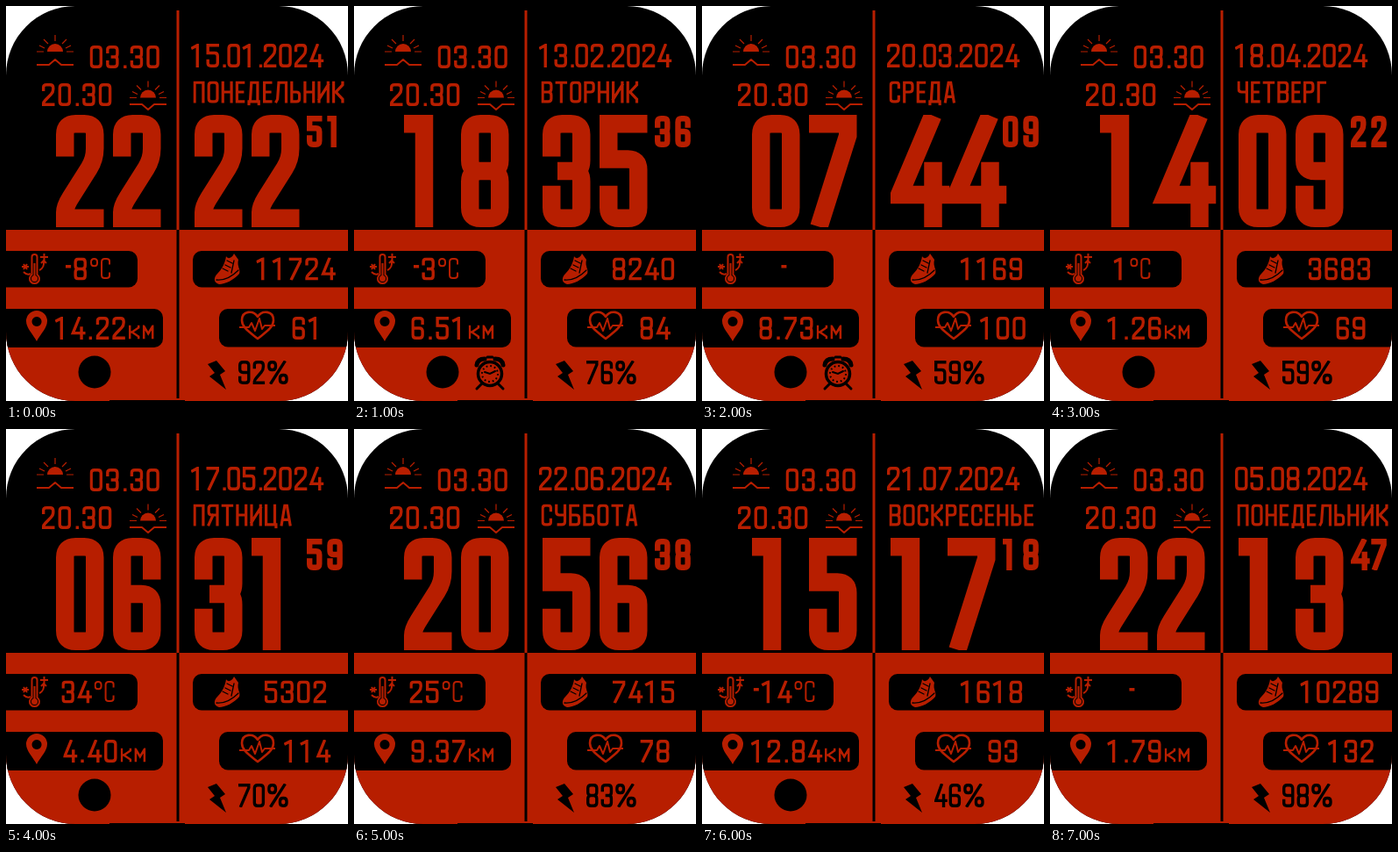
An HTML page that plays this animation: 390 by 450 pixels, repeating every 8000 ms.

```html
<!DOCTYPE html>
<html lang="ru">
<head>
<meta charset="utf-8">
<title>Циферблат</title>
<style>
  html, body { margin: 0; width: 100%; height: 100%; overflow: hidden; background: #fff; }
  svg { display: block; }
  #stage { width: 100%; height: 100%; --red: #b71e00; }
  .red { fill: var(--red); }
  .line { fill: none; stroke: var(--red); stroke-width: 2; stroke-linejoin: round; }
  .thin { stroke-width: 1.2; }
  .ink { fill: none; stroke: #000; stroke-width: 2; stroke-linecap: round; }
  .glyphs { fill: none; stroke: var(--red); stroke-linecap: square; stroke-miterlimit: 4; }
  .dark { stroke: #000; }
</style>
</head>
<body>
<svg id="stage" viewBox="0 0 390 450">
  <defs>
    <clipPath id="face"><rect width="390" height="450" rx="79"/></clipPath>
    <g id="sun">
      <path class="red" d="M-9 0a9 9 0 0 1 18 0z"/>
      <path class="line thin" d="M-21 0H-13M13 0H21M0-12V-19M-8-9L-13-14M8-9L13-14M-12-4L-18-7M12-4L18-7"/>
    </g>
  </defs>
  <g clip-path="url(#face)">
    <rect width="390" height="450"/>
    <rect class="red" y="255" width="390" height="195"/>
    <rect class="red" x="194.5" y="5" width="3" height="250"/>
    <rect x="194.5" y="255" width="3" height="192"/>
    <rect x="118" y="449" width="86" height="1"/>
    <rect x="-20" y="279" width="170" height="41.500" rx="10"/>
    <rect x="-20" y="345" width="199" height="44" rx="10"/>
    <rect x="213" y="279" width="200" height="41.500" rx="10"/>
    <rect x="243" y="345" width="170" height="43.500" rx="10"/>

    <use href="#sun" x="56" y="52"/>
    <path class="line" d="M35 67H49L56 61L63 67H77"/>
    <use href="#sun" x="162" y="104.500"/>
    <path class="line" d="M141 112H155L162 118L169 112H183"/>

    <g id="thermo">
      <path class="line" d="M29.500 306V286a3 3 0 0 1 6 0V306a5.500 5.500 0 1 1-6 0z"/>
      <path class="line" d="M32.500 293V309M18 297H26M20 294L24 300M24 294L20 300M20 303q4 4 8 2M38 301q6-3 5-10M40 293L43 290L46 293"/>
      <circle class="red" cx="32.500" cy="310.500" r="3.500"/>
      <path class="line" d="M39 286H48M43.500 282V290"/>
    </g>
    <path class="red" fill-rule="evenodd" d="M35 382C31 374 23 367 23 359a12 12 0 0 1 24 0C47 367 39 374 35 382zM35 354a5.500 5.500 0 1 0 .1 0z"/>
    <g id="shoe">
      <path class="red" d="M251 285C253 289 258 287 260 282L265 289C263 297 268 300 266 305C260 312 250 317 243 317C236 315 237 309 241 305C246 300 250 293 251 285z"/>
      <path class="ink" style="stroke-width:1.300" d="M240 312C250 313 258 308 265 301M247 299L253 302M250 295L256 298M252 290L258 293M260 290L257 304"/>
    </g>
    <path class="line" style="stroke-width:2.600" d="M287 379C277 371 269 366 269 358C269 347 282 346 287 354C292 346 305 347 305 358C305 366 297 371 287 379z"/>
    <path class="line" d="M266 366H277L280 361L284 370L289 356L292 368L295 364H307"/>
    <path d="M230 408L240 404L250 416L244 420L251 437L232 422L238 418z"/>
    <circle id="link" cx="101" cy="417" r="18.500"/>
    <g id="alarm">
      <circle class="ink" cx="155" cy="419" r="13.500" style="stroke-width:3.500"/>
      <circle class="ink" cx="155" cy="419" r="9" style="stroke-width:2;stroke-linecap:butt;stroke-dasharray:1.800 2.912"/>
      <path class="ink" style="stroke-width:5" d="M140 409Q141 402 149 402M170 409Q169 402 161 402"/>
      <path class="ink" style="stroke-width:3" d="M145 431L140 436M165 431L170 436M152 400H158"/>
      <path class="ink" d="M149 417L155 419L161 416"/>
    </g>
    <g id="labels"></g>
  </g>
</svg>
<script>
// Glyph strokes on a grid: letter = column, digit = row; lower case bends are rounded,
// "/" starts a new stroke, "z" closes it.
const DIGITS = {
  0: "a0i0i8a8z", 1: "A1E0E8", 2: "a2a0i0i3a7A8I8", 3: "a2a0i0i4E4/E4i4i8a8a6",
  4: "F0A6J6/H4H8", 5: "I0A0A3i3i8a8a6", 6: "i2i0a0a8i8i4A4", 7: "A0I0I1B8",
  8: "a0i0i4a4z/a4i4i8a8z", 9: "a6a8i8i0a0a4I4",
  ".": "B8B8", "-": "A3C3", "%": "a0d0d3a3z/f5i5i8f8z/H0B8", "°": "a0i0i3a3z"
};
const BOLD = { ...DIGITS, 1: "A0D0D8", 4: "I0A6L6/J4J8" };
const LETTERS = {
  А: "A8D0F0I8/B6H6", Б: "H0A0A8i8i4A4", В: "A4A0i0i4A4/A4A8i8i4A4", Г: "A8A0I0",
  Д: "A9A8I8I9/B8C0H0H8", Е: "I0A0A8I8/A4H4", И: "A0A8/I0I8/A7I1",
  К: "A0A8/A4C4/I0I1C4I7I8", Л: "A8B7C0I0I8", М: "A8A0E5I0I8", Н: "A0A8/I0I8/A4I4",
  О: "a0i0i8a8z", П: "A8A0I0I8", Р: "A8A0i0i4A4", С: "i2i0a0a8i8i6", Т: "A0I0/E0E8",
  У: "A0a4I4/I0i8C8", Ц: "A0A8I8I9/H0H8", Ч: "A0a4I4/I0I8", Ь: "A0A8i8i4A4",
  Я: "I8I0a0a4I4/E4A8"
};
const WIDTHS = { Е: 10.5, Г: 10.5, Д: 14.5, Л: 14.5, Ь: 12, И: 13.5, К: 13.5, С: 12.5, Р: 12.5, Ч: 12.5, Т: 13.5, Ц: 14.5 };

// h height, w glyph width, adv step, sw stroke, r bend radius
const value = { set: DIGITS, h: 26, w: 14.5, adv: 18.6, sw: 3.4, r: 3.5, dot: 9.5 };
const STYLE = {
  big: { set: BOLD, h: 128, w: 54.5, adv: 65, sw: 20.5, r: 12 },
  sec: { set: BOLD, h: 36, w: 17.5, adv: 23.3, sw: 6.4, r: 4 },
  value,
  sunTime: { ...value, adv: 18.6, dot: 9 },
  date: { ...value, h: 27, adv: 17.5, dot: 6.4, w: 14.5 },
  bat: { ...value, h: 27, w: 13.5, adv: 16.6, sw: 3.4 },
  day: { set: LETTERS, h: 25, sw: 3.2, r: 3.5, gap: 3.1, tail: 3 },
  unit: { set: LETTERS, h: 16, w: 12.5, adv: 16, sw: 2.5, r: 2 },
  deg: { set: { ...DIGITS, C: LETTERS.С }, h: 24, w: 11, adv: 14, sw: 2, r: 3.5 }
};

const $ = id => document.getElementById(id);

function make(tag, parent) {
  return parent.appendChild(document.createElementNS("http://www.w3.org/2000/svg", tag));
}

function glyphWidth(ch, s) {
  if (ch === "%") return 23.5;
  if (ch === "°") return 9;
  return s.w || WIDTHS[ch] || 13;
}

function advance(ch, s) {
  if (ch === ".") return s.dot;
  if (ch === "-") return 9.5;
  if (ch === "°") return 12;
  return s.adv || glyphWidth(ch, s) + s.gap;
}

const measure = (str, s) => [...str].reduce((sum, ch) => sum + advance(ch, s), 0);

function toward(p, q, dist) {
  const len = Math.hypot(q.x - p.x, q.y - p.y) || 1;
  const k = Math.min(dist / len, 0.5);
  return `${(p.x + (q.x - p.x) * k).toFixed(2)} ${(p.y + (q.y - p.y) * k).toFixed(2)}`;
}

function strokePath(code, left, width, s) {
  const closed = code.endsWith("z");
  const pts = code.match(/[a-zA-Z]\d/g).map(c => ({
    x: left + s.sw / 2 + (c.toLowerCase().charCodeAt(0) - 97) * (width - s.sw) / 8,
    y: s.sw / 2 + c[1] * (s.h - s.sw) / 8,
    round: c[0] >= "a"
  }));
  const n = pts.length;
  let d = "";
  pts.forEach((p, i) => {
    const inner = closed || (i > 0 && i < n - 1);
    const cmd = i ? "L" : "M";
    if (inner && p.round) {
      d += cmd + toward(p, pts[(i + n - 1) % n], s.r) + `Q${p.x} ${p.y} ` + toward(p, pts[(i + 1) % n], s.r);
    } else {
      d += `${cmd}${p.x} ${p.y}`;
    }
  });
  return d + (closed ? "Z" : "");
}

function label(style, x, y, dark) {
  const s = STYLE[style];
  const box = make("svg", $("labels"));
  const path = make("path", box);
  box.setAttribute("y", y);
  box.setAttribute("width", 200);
  box.setAttribute("height", s.h + (s.tail || 0));
  box.setAttribute("role", "img");
  path.setAttribute("class", dark ? "glyphs dark" : "glyphs");
  path.setAttribute("stroke-width", s.sw);
  return (str, at = x) => {
    let left = 0, d = "";
    for (const ch of str) {
      const w = glyphWidth(ch, s);
      for (const code of s.set[ch].split("/")) d += strokePath(code, left, w, s);
      left += advance(ch, s);
    }
    box.setAttribute("x", at);
    box.setAttribute("aria-label", str);
    path.setAttribute("d", d);
  };
}

// A number centred on cx, followed by an optional unit
function centred(cx, y, unit, unitStyle, unitWidth = 0, drop = 0) {
  const num = label("value", 0, y);
  const tail = unit && label(unitStyle, 0, y + drop);
  return str => {
    const bare = str === "-";
    const w = measure(str, value);
    const left = cx - (w + (bare ? 0 : unitWidth)) / 2;
    num(str, left);
    if (tail) tail(bare ? "" : unit, left + w);
  };
}

label("sunTime", 95.5, 45)("03.30");
label("sunTime", 41, 88)("20.30");

const fields = [
  label("date", 211, 43),
  label("day", 213.5, 85.5),
  label("big", 57, 124),
  label("big", 215, 124),
  label("sec", 343, 125),
  centred(95, 286.5, "°C", "deg", 26, 0.5),
  centred(332, 286.5),
  centred(113, 354, "КМ", "unit", 30, 9.5),
  centred(345, 354),
  label("bat", 265, 404, true)
];

// date, day, hours, minutes, seconds, temperature, steps, distance, pulse, battery, icons
const STATES = [
  "15.01.2024 ПОНЕДЕЛЬНИК 22 22 51 -8 11724 14.22 61 92% link",
  "13.02.2024 ВТОРНИК 18 35 36 -3 8240 6.51 84 76% link+alarm",
  "20.03.2024 СРЕДА 07 44 09 - 1169 8.73 100 59% link+alarm",
  "18.04.2024 ЧЕТВЕРГ 14 09 22 1 3683 1.26 69 59% link",
  "17.05.2024 ПЯТНИЦА 06 31 59 34 5302 4.40 114 70% link",
  "22.06.2024 СУББОТА 20 56 38 25 7415 9.37 78 83% none",
  "21.07.2024 ВОСКРЕСЕНЬЕ 15 17 18 -14 1618 12.84 93 46% link",
  "05.08.2024 ПОНЕДЕЛЬНИК 22 13 47 - 10289 1.79 132 98% none"
].map(row => row.split(" "));

let shown = -1;
function render(ms) {
  const i = Math.floor(ms / 1000) % STATES.length;
  if (i === shown) return;
  shown = i;
  const state = STATES[i];
  fields.forEach((set, k) => set(state[k]));
  for (const id of ["link", "alarm"]) {
    $(id).style.display = state[10].includes(id) ? "" : "none";
  }
}

const start = performance.now();
function tick() {
  render(performance.now() - start);
  requestAnimationFrame(tick);
}
tick();
</script>
</body>
</html>
```
